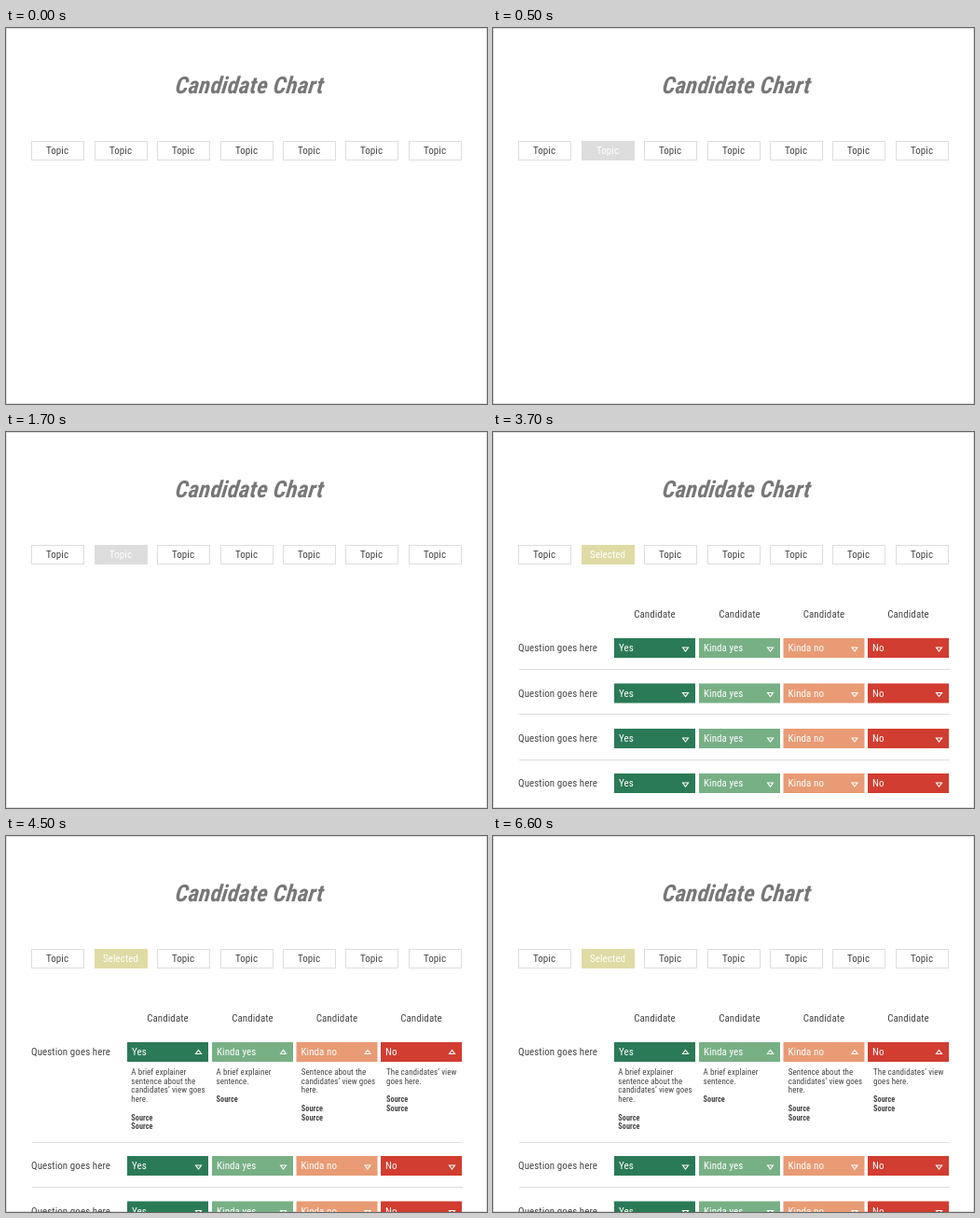
Write an HTML page with a canvas that moves like this. It is 516x403 px and loops after 8 s.

```html
<!DOCTYPE html>
<html lang="en">
<head>
<meta charset="utf-8">
<title>Candidate Chart</title>
<style>
  html, body { margin: 0; width: 100%; height: 100%; overflow: hidden; background: #fff; }
  canvas { display: block; }
</style>
</head>
<body>
<canvas id="stage" width="516" height="403"></canvas>
<script>
const ctx = document.getElementById('stage').getContext('2d');
const LOOP = 8000, HOVER_AT = 500, SELECT_AT = 2500, EXPAND_AT = 4500;
const FAMILY = '"Roboto Condensed", Roboto, sans-serif';
const INK = '#444', RULE = '#ddd';

const topics = [27, 95, 162, 230, 297, 364, 432];
const columns = [
  { x: 130, color: '#2b7a57', answer: 'Yes', sources: 2,
    lines: ['A brief explainer', 'sentence about the', 'candidates’ view goes', 'here.'] },
  { x: 221, color: '#78b086', answer: 'Kinda yes', sources: 1,
    lines: ['A brief explainer', 'sentence.'] },
  { x: 311.5, color: '#e89b74', answer: 'Kinda no', sources: 2,
    lines: ['Sentence about the', 'candidates’ view goes', 'here.'] },
  { x: 402, color: '#d13d30', answer: 'No', sources: 2,
    lines: ['The candidates’ view', 'goes here.'] }
];
columns[3].lines = ['The candidates’ view', 'goes here.'];

function setFont(size, style = '') {
  ctx.font = `${style} condensed ${size}px ${FAMILY}`;
  if ('fontStretch' in ctx) ctx.fontStretch = 'condensed';
}

// Tighter tracking when no condensed face is available.
setFont(100);
const tracking = ctx.measureText('Topic').width < 235 ? 0.006 : -0.045;

function text(str, x, y, { size = 11, color = INK, style = '', align = 'left' } = {}) {
  setFont(size, style);
  ctx.letterSpacing = `${tracking * size}px`;
  ctx.textAlign = align;
  ctx.fillStyle = color;
  ctx.fillText(str, x, y);
}

function box(x, y, w, h, fill, border) {
  ctx.fillStyle = fill;
  ctx.fillRect(x, y, w, h);
  if (!border) return;
  ctx.strokeStyle = border;
  ctx.lineWidth = 1;
  ctx.strokeRect(x + 0.5, y + 0.5, w - 1, h - 1);
}

function drawTitle() {
  ctx.save();
  ctx.translate(181, 70);
  ctx.transform(1, 0, -0.12, 1, 0, 0);
  text('Candidate Chart', 0, 0, { size: 25, color: '#777', style: 'italic 700' });
  ctx.restore();
}

function drawTopics(t) {
  topics.forEach((x, i) => {
    const active = i === 1 && t >= HOVER_AT;
    const selected = active && t >= SELECT_AT;
    const fill = selected ? '#dfdba5' : active ? RULE : '#fff';
    box(x, 121, 57, 21, fill, selected ? fill : RULE);
    text(selected ? 'Selected' : 'Topic', x + 28, 135,
      { color: active ? '#fff' : INK, align: 'center' });
  });
}

function drawArrow(x, y, up) {
  const d = up ? -2 : 2;
  ctx.beginPath();
  ctx.moveTo(x - 3, y - d);
  ctx.lineTo(x + 3, y - d);
  ctx.lineTo(x, y + d);
  ctx.closePath();
  ctx.strokeStyle = '#fff';
  ctx.lineWidth = 1.1;
  ctx.stroke();
}

function drawRow(y, open) {
  text('Question goes here', 27, y + 14);
  for (const { x, color, answer } of columns) {
    box(x, y, 87, 21, color);
    text(answer, x + 5, y + 14, { color: '#fff' });
    drawArrow(x + 76.5, y + (open ? 10.5 : 12), open);
  }
}

function drawDetails() {
  columns.forEach(({ lines, sources }, i) => {
    const x = 134.3 + 91.25 * i;
    const lineY = n => 256 + 9.7 * n;
    lines.forEach((line, n) => text(line, x, lineY(n), { size: 9 }));
    for (let n = 0; n < sources; n++) {
      text('Source', x, lineY(lines.length + 1 + n), { size: 8.2, style: '700' });
    }
  });
}

function drawTable(expanded) {
  columns.forEach(({ x }) => text('Candidate', x + 43.5, 199, { align: 'center' }));
  const shift = expanded ? 73.8 : 0;
  for (let i = 0; i < 4; i++) {
    const y = Math.round((221 + 48.4 * i + (i ? shift : 0)) * 2) / 2;
    drawRow(y, expanded && i === 0);
    if (i < 3) box(28, Math.round(254 + 48.4 * i + shift), 462, 1, RULE);
  }
  if (expanded) drawDetails();
}

function draw(now) {
  const t = now % LOOP;
  box(0, 0, 516, 403, '#fff', RULE);
  drawTitle();
  drawTopics(t);
  if (t >= SELECT_AT) drawTable(t >= EXPAND_AT);
}

const start = performance.now();
function frame() {
  draw(performance.now() - start);
  requestAnimationFrame(frame);
}
frame();
</script>
</body>
</html>
```
